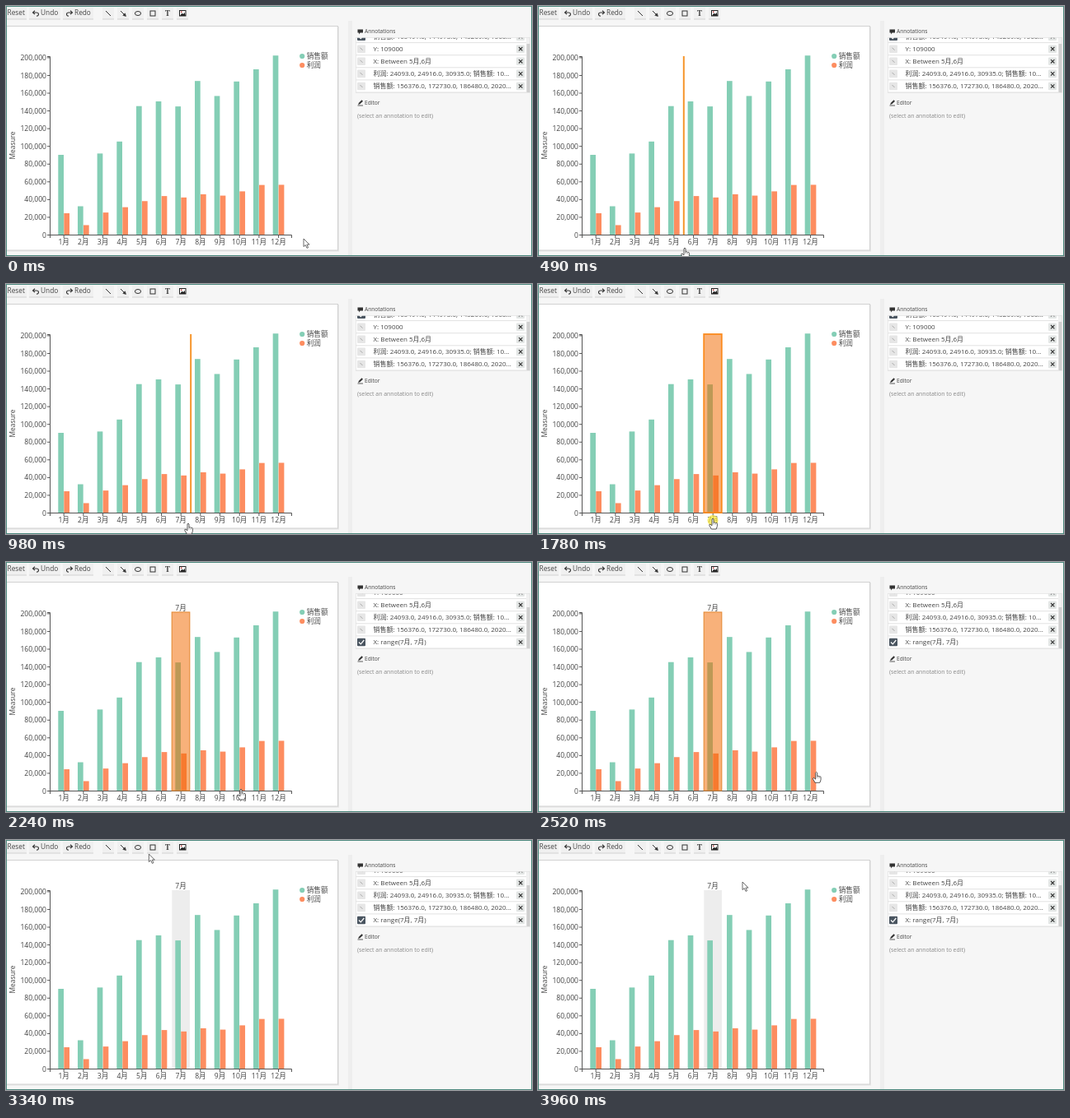
Recreate the animation shown at these times as an HTML page. Size 638 px wide and 304 px high, loop 5020 ms.

```html
<!DOCTYPE html>
<html lang="en">
<head>
<meta charset="utf-8">
<title>Chart annotation</title>
<style>
  html, body { margin: 0; width: 100%; height: 100%; overflow: hidden; background: #f6f6f6; }
  svg { display: block; width: 100vw; height: 100vh; }
  text { font-family: "Open Sans", "Noto Sans CJK SC", "Noto Sans CJK", sans-serif; fill: #444; }
</style>
</head>
<body>
<svg id="stage" viewBox="0 0 638 304"></svg>
<script>
const LOOP = 5020;
const GREEN = '#84ceb5', ORANGE = '#fd8d60', INK = '#333';
const BASE = 278, FIRST = 70.2, BAND = 23.67, PX_PER_UNIT = 0.001078;
const sales = [90000, 32000, 91500, 105000, 144973, 150300, 144600, 173300, 156376, 172730, 186480, 202000];
const profit = [24093, 10700, 24916, 30935, 37800, 43500, 41900, 45500, 44000, 48800, 56000, 56200];

const rect = (x, y, w, h, fill, extra = '') =>
  `<rect x="${x}" y="${y}" width="${w}" height="${h}" fill="${fill}" ${extra}/>`;
const path = (d, stroke = INK, width = 1, fill = 'none') =>
  `<path d="${d}" stroke="${stroke}" stroke-width="${width}" fill="${fill}"/>`;
// y is the vertical centre of the line of text
const text = (x, y, size, str, extra = '') =>
  `<text x="${x}" y="${y + size * 0.36}" font-size="${size}" ${extra}>${str}</text>`;

function toolbar() {
  const button = (x, w) => rect(x, 2, w, 14, '#f0f0f0') + rect(x, 15.5, w, 1, '#d4d4d4');
  const curl = 'M2 4H6Q8.5 4 8.5 6T6 8.2M4 1.6L1.5 4L4 6.2';
  let out = button(1, 24) + button(28, 38) + button(69, 37);
  for (let i = 0; i < 6; i++) out += button(117 + i * 18, 14);
  return out +
    text(1.5, 8.5, 8.3, 'Reset') + text(42, 8.5, 8.3, 'Undo') + text(83, 8.5, 8.3, 'Redo') +
    `<g transform="translate(31 4)">${path(curl, INK, 1.1)}</g>` +
    `<g transform="translate(82 4) scale(-1 1)">${path(curl, INK, 1.1)}</g>` +
    path('M121 6L127 12') +
    path('M139 6L144 11') + path('M145.5 12.5L141.8 11.4L144.4 8.8Z', INK, 0.6, INK) +
    '<ellipse cx="160" cy="9" rx="3.6" ry="2.5" fill="none" stroke="#333"/>' +
    rect(175, 6, 6, 6, 'none', 'stroke="#333"') +
    '<text x="196" y="12" font-size="9" font-weight="bold" text-anchor="middle" style="font-family:\'Noto Serif\',serif">T</text>' +
    rect(210.5, 5.5, 7.5, 6.5, '#fff', 'stroke="#222"') +
    path('M211 12L213.5 8.5L215 10L216.5 8L218 12Z', 'none', 0, '#222') +
    rect(212, 6.5, 1.5, 1.5, '#b33');
}

function axes() {
  let out = path(`M50 61.5H53.5V${BASE + 4}M53.5 ${BASE + .5}H346.5V${BASE + 4}`, '#555');
  for (let v = 0; v <= 200000; v += 20000) {
    const y = BASE + 0.5 - v * PX_PER_UNIT;
    out += path(`M50 ${y}H53.5`, '#555') +
      text(49, y, 8.6, v.toLocaleString('en-US'), 'text-anchor="end"');
  }
  sales.forEach((_, i) => {
    const x = FIRST + i * BAND;
    out += path(`M${x} ${BASE}V${BASE + 4}`, '#555') +
      text(x, 287, 8.6, `${i + 1}月`, 'text-anchor="middle"');
  });
  return out + text(0, 0, 8.4, 'Measure', 'text-anchor="middle" transform="translate(8 169.5) rotate(-90)"') +
    `<circle cx="359.2" cy="61" r="3.1" fill="${GREEN}"/><circle cx="359.2" cy="72" r="3.1" fill="${ORANGE}"/>` +
    text(364.7, 61, 8.6, '销售额') + text(364.7, 72, 8.6, '利润');
}

function bars() {
  const bar = (x, v, fill) => rect(x, BASE - v * PX_PER_UNIT, 6.7, v * PX_PER_UNIT, fill);
  return sales.map((v, i) => {
    const x = FIRST + i * BAND;
    return bar(x - 6.9, v, GREEN) + bar(x + 0.1, profit[i], ORANGE);
  }).join('');
}

const ROW = 15.1;
const rows = [
  '销售额: 105491.0, 144973.0, 145209.0, 1508...',
  'Y: 109000',
  'X: Between 5月,6月',
  '利润: 24093.0, 24916.0, 30935.0; 销售额: 10...',
  '销售额: 156376.0, 172730.0, 186480.0, 2020...',
  'X: range(7月, 7月)'
];

function list(last) {
  let out = '';
  for (let i = last - 4; i <= last; i++) {
    const y = 97.5 - (last - i) * ROW, checked = i === 0 || i === 5;
    out += rect(424, y + 7, 207, 1, '#e2e2e2') +
      rect(426, y - 4.8, 10, 9.6, checked ? '#4a5560' : '#e6e6e6', 'rx="1"') +
      (checked ? path(`M428 ${y}L430.3 ${y + 2.4}L434.3 ${y - 2.5}`, '#fff', 1.2)
               : path(`M429.5 ${y - 1.5}L432.5 ${y + 1.5}`, '#999', 0.8)) +
      text(445.5, y, 8, rows[i]) +
      rect(619, y - 4.8, 10, 9.6, '#e3e6e5', 'rx="1"') +
      path(`M622 ${y - 2.2}L626.4 ${y + 2.2}M626.4 ${y - 2.2}L622 ${y + 2.2}`, '#333', 1.1);
  }
  const thumbTop = last === 5 ? 55 : 46;
  return out + rect(631, 38, 5, 67, '#f1f1f1') + rect(631.5, thumbTop, 4.5, 105 - thumbTop, '#cfcfcf');
}

function sidebar() {
  return rect(415, 18, 5, 285, '#eeeeee') +
    path('M426.5 28.5H433V32.5H429.5L428 34.5V32.5H426.5Z', 'none', 0, '#333') +
    text(435, 31, 6.6, 'Annotations') +
    rect(424, 38, 212, 67, '#fff') +
    `<clipPath id="listClip">${rect(424, 38, 213, 67.5, '#000')}</clipPath>` +
    `<g clip-path="url(#listClip)"><g id="listBefore">${list(4)}</g><g id="listAfter">${list(5)}</g></g>` +
    rect(424.5, 38.5, 211, 67, 'none', 'stroke="#e4e4e4" stroke-width=".8"') +
    path('M427 120L428 117.8L431.5 114.3L433 115.7L429.3 119.3Z', 'none', 0, '#333') +
    path('M426.5 121H433', INK, 0.8) +
    text(435, 118, 6.6, 'Editor') +
    text(426, 134, 6.9, '(select an annotation to edit)', 'style="fill:#888"');
}

const arrowShape = 'M0 0V9.6L2.2 7.6L4 11.4L5.6 10.7L3.9 7.1H7Z';
const handShape = 'M-1 1Q0 -.8 1 1V5.2L2.4 4.7L3.4 5.6L4.8 5.4L5.4 6.5V9.5L4.2 13H-1.6L-4.2 8.6Q-4.6 7 -3 7.2L-1 8.8Z';

document.getElementById('stage').innerHTML =
  rect(0, 0, 638, 304, '#f6f6f6') + toolbar() +
  rect(-2, 25, 406, 273.5, '#e6e6e6') +
  rect(-2, 24.5, 404.5, 272.5, '#fff', 'stroke="#d2d2d2"') +
  rect(201.3, 61, 21.6, 217, '#ededed', 'id="shade"') +
  bars() + axes() +
  rect(201.2, 61, 21.6, 217, '#f26a00', 'id="band" fill-opacity=".52" stroke="#fb8b1e"') +
  rect(0, 61, 2, 217, '#f6962c', 'id="guide"') +
  text(212, 55.5, 8.6, '7月', 'id="label" text-anchor="middle"') +
  sidebar() +
  rect(0.5, 0.5, 637, 303, 'none', 'stroke="#4f8b80"') +
  '<circle id="click" cx="212" cy="287.5" r="6.5" fill="#f4e43c" fill-opacity=".75"/>' +
  `<g id="cursor"><g id="arrow">${path(arrowShape, '#444', 0.8, '#fff')}</g>` +
  `<g id="hand">${path(handShape, '#333', 0.8, '#fff') + path('M1 5V7.5M3.2 5.8V7.8', '#555', 0.5)}</g></g>`;

// Pointer tip: [time, x, y]
const pointerKeys = [
  [0, 361, 283], [490, 178, 294], [560, 157, 293], [630, 149, 292], [980, 221, 291],
  [1310, 221, 291], [1310, 212, 285], [2240, 212, 285], [2240, 285, 276], [2660, 364, 245],
  [2790, 363, 245], [2850, 363, 245], [3270, 172, 24], [3480, 176, 3],
  [3690, 246, 60], [3820, 210, 47], [3960, 248, 51]
];

// The pointer advances in steps of 70 ms
function pointerAt(t) {
  const i = pointerKeys.findLastIndex(k => k[0] <= t);
  const [t0, x0, y0] = pointerKeys[i];
  if (i === pointerKeys.length - 1) return [x0, y0];
  const [t1, x1, y1] = pointerKeys[i + 1];
  const p = Math.floor((t - t0) / 70) * 70 / (t1 - t0);
  return [x0 + (x1 - x0) * p, y0 + (y1 - y0) * p];
}

const el = id => document.getElementById(id);
const show = (id, on) => { el(id).style.display = on ? '' : 'none'; };

function draw(t) {
  const [x, y] = pointerAt(t);
  const added = t >= 1910, released = t >= 2590;
  const hand = t >= 70 && t < 3270;
  el('cursor').setAttribute('transform', `translate(${x} ${y})`);
  show('hand', hand);
  show('arrow', !hand);

  const edge = FIRST - BAND / 2;
  el('guide').setAttribute('x', edge + Math.round((x - edge) / BAND) * BAND - 0.9);
  show('guide', t >= 70 && t < 1310);

  show('band', t >= 1310 && !released);
  el('band').setAttribute('stroke', added ? '#e58a35' : '#fb8b1e');
  el('band').setAttribute('stroke-width', added ? 1.1 : 1.8);
  show('shade', released);
  show('label', added);
  show('click', t >= 1510 && !added);
  show('listBefore', !added);
  show('listAfter', added);
}

const start = performance.now();
function tick() {
  draw((performance.now() - start) % LOOP);
  requestAnimationFrame(tick);
}
tick();
</script>
</body>
</html>
```
